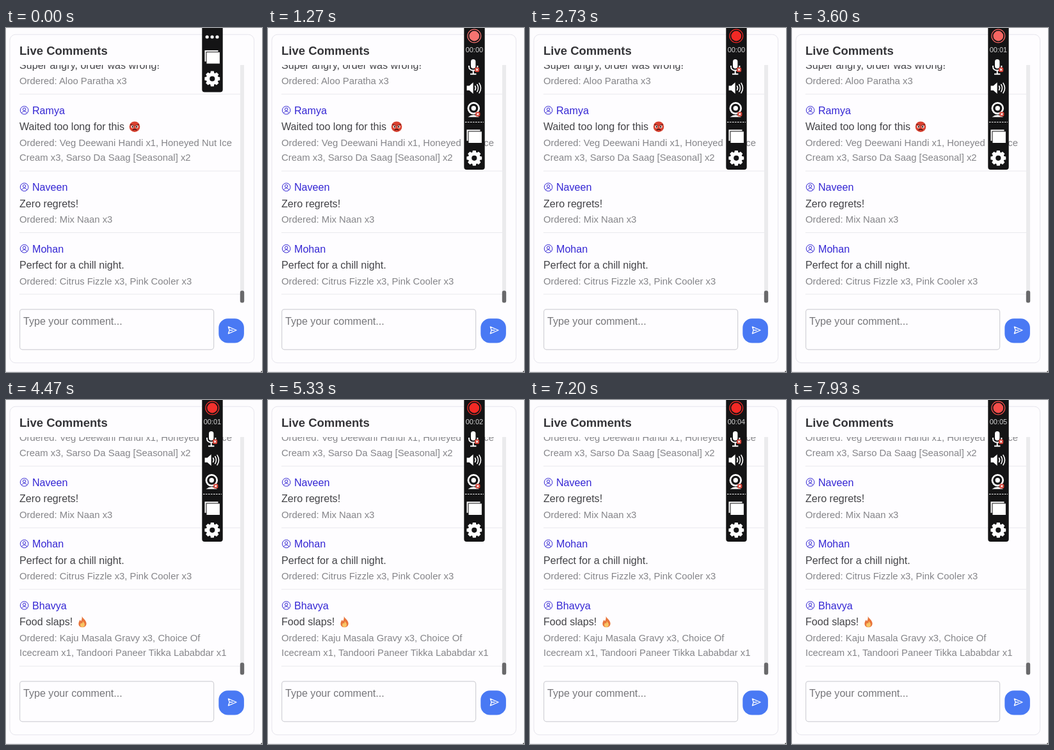
An HTML page that plays this animation: 400 by 539 pixels, repeating every 8000 ms.

```html
<!DOCTYPE html>
<html lang="en">
<head>
<meta charset="utf-8">
<title>Live Comments</title>
<style>
  html, body { margin: 0; width: 100%; height: 100%; overflow: hidden; background: #fdfcfe; }
  svg { display: block; width: 400px; height: 539px; }
  text { font-family: "Liberation Sans", Arial, sans-serif; font-size: 16.1px; fill: #434347; }
  .title { font-size: 18.5px; font-weight: bold; fill: #343438; }
  .name { fill: #3426d4; }
  .order { font-size: 14.87px; fill: #858589; }
  .hint { fill: #77777b; }
  .time { font-size: 11px; fill: #d4d4d4; text-anchor: middle; }
</style>
</head>
<body>
<svg viewBox="0 0 400 539">
  <defs>
    <clipPath id="view"><rect x="15" y="58" width="351" height="372"/></clipPath>
    <g id="user" fill="none" stroke="#3426d4">
      <circle r="6.3"/>
      <circle cy="-1.5" r="2.2"/>
      <path d="M-4 4.7C-3.4 .7 3.4 .7 4 4.7"/>
    </g>
    <g id="angry">
      <circle r="8.3" fill="#d9402f"/>
      <path d="M-6.4 -3.6L-1.4 -1.6M6.4 -3.6L1.4 -1.6" stroke="#6b1a18" stroke-width="1.4" stroke-linecap="round"/>
      <circle cx="-3.5" r="2.3" fill="#f7e9e4"/>
      <circle cx="3.5" r="2.3" fill="#f7e9e4"/>
      <circle cx="-3.1" r="1.2" fill="#2c1414"/>
      <circle cx="3.1" r="1.2" fill="#2c1414"/>
      <path d="M-2.6 5Q0 3.2 2.6 5" fill="none" stroke="#4b1514" stroke-width="1.5" stroke-linecap="round"/>
    </g>
    <g id="fire">
      <path d="M-.8 -8.6C.8 -5.2 5.2 -3 6 1.6C6.7 5.8 3.8 8.5 0 8.5C-3.9 8.5 -6.6 5.8 -6 1.8C-5.7 -.4 -4.6 -1.6 -4.1 -3.2C-3.2 -2.4 -2.8 -1.8 -2.5 -.9C-1 -3 -.6 -5.8 -.8 -8.6Z" fill="#e8743b"/>
      <path d="M.4 -1.6C1.2 .6 3.6 1.6 3.5 4.6C3.4 7 1.9 8.2 0 8.2C-2 8.2 -3.6 6.9 -3.5 4.8C-3.4 3.2 -2.6 2.4 -2.2 1.4C-1.6 1.9 -1.3 2.2 -1 2.8C0 1.6 .5 .2 .4 -1.6Z" fill="#f8c566"/>
    </g>
    <g id="off">
      <rect x="-3.6" y="-3.6" width="7.2" height="7.2" rx="2" fill="#cf3a2e"/>
      <path d="M-1.6 -1.6L1.6 1.6M1.6 -1.6L-1.6 1.6" stroke="#fff" stroke-width="1.2"/>
    </g>
  </defs>

  <rect width="400" height="539" fill="#fdfcfe"/>
  <path d="M0 538.5H398" stroke="#e9e8ec"/>
  <rect x="398.5" y="537.5" width="1.5" height="1.5" fill="#333"/>
  <rect x="6" y="10.2" width="381.6" height="514.5" rx="9" fill="#fefdff" stroke="#e6e5ec"/>
  <text class="title" x="21" y="42">Live Comments</text>

  <g clip-path="url(#view)"><g id="list"></g></g>
  <rect x="366" y="58" width="6" height="372.5" fill="#ebebed"/>
  <rect x="365.8" y="411.5" width="6.4" height="19" rx="3" fill="#69696b"/>

  <rect x="21.6" y="440.8" width="303" height="63" rx="4" fill="#fefdff" stroke="#d2d2d7" stroke-width="1.2"/>
  <text class="hint" x="27" y="465">Type your comment...</text>
  <rect x="332.3" y="455.3" width="39.6" height="38.2" rx="14.5" fill="#4979f4"/>
  <path d="M347.4 468.2L360 473.5L347.4 478.8L349.2 473.5ZM349.2 473.5H354.4" fill="none" stroke="#fff" stroke-width="1.3" stroke-linejoin="round"/>

  <g id="bar">
    <path id="panel" fill="#141415"/>
    <g id="dots" fill="#fff">
      <circle cx="314.2" cy="14" r="2.6"/><circle cx="322.1" cy="14" r="2.6"/><circle cx="330" cy="14" r="2.6"/>
    </g>
    <g id="tools">
      <circle id="ring" cx="322.3" cy="12.5" r="10.4" fill="none" stroke-width="1.2"/>
      <circle id="disc" cx="322.3" cy="12.5" r="7.9"/>
      <text id="clock" class="time" x="322.4" y="38"></text>
      <g fill="none" stroke="#fff" stroke-width="2">
        <rect x="317" y="49" width="7.4" height="14.5" rx="3.7" fill="#fff" stroke="none"/>
        <path d="M314 59V60.5C314 68.6 327.4 68.6 327.4 60.5V59M320.7 66.5V71.5M316 72.2H325.4"/>
      </g>
      <use href="#off" x="326.6" y="65.3"/>
      <path d="M310.6 90.5H314.6L320.6 85.2V103L314.6 97.7H310.6Z" fill="#fff"/>
      <g fill="none" stroke="#fff" stroke-width="1.6" stroke-linecap="round">
        <path d="M323.6 91Q325.5 94.1 323.6 97.2M326.8 88.5Q330.2 94.1 326.8 99.7M330 86.4Q335 94.1 330 101.8"/>
      </g>
      <circle cx="321.3" cy="125.8" r="8.4" fill="none" stroke="#fff" stroke-width="2.7"/>
      <circle cx="321.3" cy="125.8" r="3.7" fill="#fff"/>
      <path d="M312.5 139.5Q321.3 133 330 139.5Z" fill="#fff"/>
      <use href="#off" x="327.8" y="135"/>
      <path d="M308 147.5H337" stroke="#fff" stroke-width="1.2" stroke-dasharray="2.6 1.4"/>
    </g>
    <g id="base" fill="#fff">
      <rect x="310.5" y="35" width="21" height="17.5"/>
      <rect x="313" y="37.6" width="21.4" height="18.6" stroke="#141415"/>
      <g transform="translate(322.3 79.5)">
        <g id="teeth"></g>
        <circle r="6.8" fill="none" stroke="#fff" stroke-width="5.4"/>
      </g>
    </g>
  </g>
</svg>
<script>
const LOOP = 8000, EXPAND = 930, POST = 3930, SHIFT = 120.4;
const $ = id => document.getElementById(id);

const comments = [
  { text: "Super angry, order was wrong!", order: ["Ordered: Aloo Paratha x3"] },
  { name: "Ramya", text: "Waited too long for this", emoji: ["angry", 201],
    order: ["Ordered: Veg Deewani Handi x1, Honeyed Nut Ice", "Cream x3, Sarso Da Saag [Seasonal] x2"] },
  { name: "Naveen", text: "Zero regrets!", order: ["Ordered: Mix Naan x3"] },
  { name: "Mohan", text: "Perfect for a chill night.", order: ["Ordered: Citrus Fizzle x3, Pink Cooler x3"] },
  { name: "Bhavya", text: "Food slaps!", emoji: ["fire", 119.5],
    order: ["Ordered: Kaju Masala Gravy x3, Choice Of", "Icecream x1, Tandoori Paneer Tikka Lababdar x1"] }
];

function buildList() {
  let top = 7.2, out = "";
  const line = (x, y, cls, s) => `<text class="${cls}" x="${x}" y="${y}">${s}</text>`;
  for (const c of comments) {
    if (c.name) out += `<use href="#user" x="28.6" y="${top + 25.2}"/>` + line(41, top + 31.3, "name", c.name);
    out += line(21, top + 56.6, "", c.text);
    if (c.emoji) out += `<use href="#${c.emoji[0]}" x="${c.emoji[1]}" y="${top + 51}"/>`;
    c.order.forEach((s, i) => out += line(21, top + 81.1 + i * 23.6, "order", s));
    top += c.order.length > 1 ? 120.4 : 96.5;
    out += `<path d="M21 ${top}H366" stroke="#e9e9ed"/>`;
  }
  $("list").innerHTML = out;
}

function buildGear() {
  let out = "";
  for (let a = 0; a < 360; a += 45)
    out += `<path d="M-3.4 -7L-2.4 -11.9H2.4L3.4 -7Z" transform="rotate(${a})"/>`;
  $("teeth").innerHTML = out;
}

// Starts of the record light's fades, and how red it becomes
const fades = [[2060, 1], [2770, 0], [3480, 1], [4220, 0], [4910, 1], [5640, 0], [6330, 1], [7100, 0], [7770, 1]];
const ticks = [3530, 4530, 5400, 6370, 7340];

function redness(t) {
  if (t < 2060) return Math.min(1, Math.max(0, (1700 - t) / 660));
  const [start, to] = fades.filter(f => f[0] <= t).pop();
  const p = Math.min(1, (t - start) / (to ? 540 : 490));
  return to ? 1 - (1 - p) ** 5 : 1 - p ** 5;
}

const blend = r => `rgb(${255 - 13 * r},${255 - 214 * r},${255 - 218 * r})`;

function draw(t) {
  const open = t >= EXPAND, bottom = open ? 222 : 100.5;
  $("panel").setAttribute("d", `M306.3 0V${bottom - 4}q0 4 4 4H334.7q4 0 4 -4V0Z`);
  $("dots").style.display = open ? "none" : "";
  $("tools").style.display = open ? "" : "none";
  $("base").setAttribute("transform", `translate(0 ${open ? 124.3 : 0})`);
  $("list").setAttribute("transform", `translate(0 ${t >= POST ? -SHIFT : 0})`);
  const color = blend(redness(t));
  $("disc").setAttribute("fill", color);
  $("ring").setAttribute("stroke", color);
  $("clock").textContent = "00:0" + ticks.filter(k => k <= t).length;
}

buildList();
buildGear();
const begin = performance.now();
function frame(now) {
  draw(Math.max(0, now - begin) % LOOP);
  requestAnimationFrame(frame);
}
draw(0);
requestAnimationFrame(frame);
</script>
</body>
</html>
```
